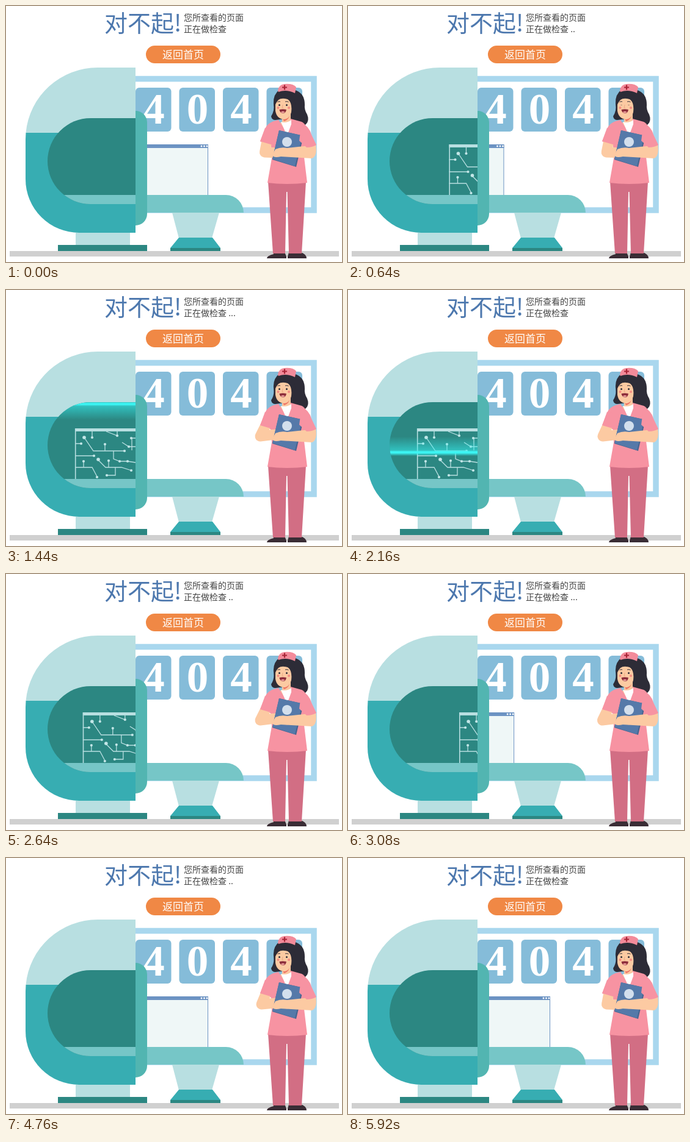
These frames come from a looping animation (550x420 px, 6040 ms). An HTML page:

```html
<!DOCTYPE html>
<html lang="zh">
<head>
<meta charset="utf-8">
<style>
html, body { margin: 0; width: 100%; height: 100%; overflow: hidden; background: #fff; }
svg { display: block; width: 550px; height: 420px; font-family: "Noto Sans CJK SC", "Noto Sans CJK", "Noto Sans SC", sans-serif; }
.digit { font: bold 71px "Liberation Serif", serif; fill: #fff; text-anchor: middle; }
</style>
</head>
<body>
<svg viewBox="0 0 550 420">
  <defs>
    <clipPath id="cavity"><path d="M212 184H138.500A70.500 70.500 0 0 0 138.500 325H212Z"/></clipPath>
    <linearGradient id="glow" x2="0" y2="1">
      <stop stop-color="#35eeee" stop-opacity="0"/>
      <stop offset=".7" stop-color="#35eeee" stop-opacity=".55"/>
      <stop offset=".78" stop-color="#3cf6f4"/>
      <stop offset=".84" stop-color="#3cf6f4"/>
      <stop offset="1" stop-color="#35eeee" stop-opacity="0"/>
    </linearGradient>
  </defs>

  <text x="161" y="42" font-size="38" fill="#4d78ae">对不起!</text>
  <g font-size="14" fill="#444">
    <text x="291" y="24">您所查看的页面</text>
    <text x="291" y="43" id="status">正在做检查</text>
  </g>
  <rect x="229" y="65" width="122" height="29" rx="14.5" fill="#f08845"/>
  <text x="256" y="86" font-size="17" font-weight="500" fill="#fff">返回首页</text>

  <path d="M6 402H545V411H6Z" fill="#d0d0d0"/>
  <path d="M200 119.500H504V335H200" fill="none" stroke="#a9d7ee" stroke-width="9.500"/>
  <g id="tiles" fill="#85bcd9"></g>

  <g id="page">
    <path d="M215 227.500H330.500V311H215Z" fill="#eff7f7" stroke="#6c93c3"/>
    <path d="M215 227H331V233H215Z" fill="#6c93c3"/>
    <g fill="#fff"><circle cx="320" cy="230" r="1.400"/><circle cx="324.500" cy="230" r="1.400"/><circle cx="329" cy="230" r="1.400"/></g>
  </g>

  <path d="M212 101H150A118 118 0 0 0 32.500 208H212Z" fill="#b8dfe1"/>
  <path d="M32.500 208H212V372H120A88 88 0 0 1 32 284V219Z" fill="#37adb2"/>
  <path d="M114 372H203V392H114Z" fill="#b8dfe1"/>
  <path d="M85 392H231V402H85Z" fill="#2c8782"/>
  <g clip-path="url(#cavity)">
    <path d="M60 184H212V325H60Z" fill="#2c8782"/>
    <g id="scan" fill="none" stroke="#b8dfe1" stroke-width="1.300">
      <path d="M0 0H120V5H0Z" fill="#b8dfe1" stroke="none"/>
      <path d="M.700 0V84" stroke-width="1.600"/>
      <path d="M15 15L30 37H81M28 5V16M0 25H10M49 26V37M51 5L69 12V5M99 16H92M99 30H88L77 23M0 45H31M38 52L50 64H76L92 69M55 53V64M14 54V64M0 64H28L36 79M52 77H66V64M63 37V50L73 54H86L99 56M93 16V36"/>
      <g id="nodes" fill="#c4e7e8" stroke="none"></g>
    </g>
    <rect id="beam" x="68" y="-26" width="144" height="32" fill="url(#glow)"/>
    <path d="M60 310H212V326H60Z" fill="#76c6c7"/>
  </g>
  <path d="M231 310H360A29 29 0 0 1 389 339H231Z" fill="#76c6c7"/>
  <path d="M212 172A19 19 0 0 1 231 191V341A19 19 0 0 1 212 360Z" fill="#52b5b1"/>
  <path d="M272 339H349L337 381H283Z" fill="#b8dfe1"/>
  <path d="M283 380H338L351 397H269Z" fill="#37adb2"/>
  <path d="M269 397H351V402H269Z" fill="#2c8782"/>

  <!-- nurse -->
  <path d="M448 137Q462 132 478 140Q489 146 489 162Q488 170 493 178Q497 188 491 194Q484 200 475 197Q466 193 466 184L441 187Q435 187 434 181Q440 172 438 160Q437 145 448 137Z" fill="#2d2c37"/>
  <path d="M438 404L455 401L459 411V414H427Q427 410 438 407ZM464 401L482 404Q492 407 492 414H461V411Z" fill="#3a2d35"/>
  <path d="M429 288H491L484 406H463L460.500 305H459L457 406H437Z" fill="#d26e84"/>
  <path d="M452 176H466V190L475 198L462 210L445 194L452 190Z" fill="#fbc7a0"/>
  <path d="M452 183Q460 184 465 178Q463 187 455 189Z" fill="#ee7463"/>
  <path d="M446 187Q428 190 424 202L416 222L434 229L435 250L428 290Q460 294 493 290L488 248L498 230L499 218Q493 194 484 190L466 185L461 210Z" fill="#f793a2"/>
  <path d="M450 190Q459 193 467 187L467 194L460 213Z" fill="#fff"/>
  <path id="arm" fill="none" stroke="#fccaa2" stroke-width="17" stroke-linejoin="round" stroke-linecap="round"/>
  <path d="M424 200L416 222L440 229L448 206Z" fill="#f793a2"/>
  <path d="M447 204L487 213L475 264L436 252Z" fill="#47658f"/>
  <path d="M447 204L485 212.500L473 263L436 251Z" fill="#5579a9"/>
  <circle cx="460" cy="223" r="8" fill="#d3dfed"/>
  <path d="M441 235Q450 231 460 233L497 229L507 227Q510 246 501 250L450 247Q437 250 436 244Z" fill="#fccaa2"/>
  <path d="M484 192Q496 197 500 211L508 228Q501 232 492 232L480 221Z" fill="#f793a2"/>

  <path d="M441 155Q446 147 462 149Q468 154 468 169Q466 185 455 186Q443 185 441 172Z" fill="#fccaa2"/>
  <path d="M439 168Q436 143 456 140Q476 142 474 172L467 176Q469 158 461 153Q451 150 446 154Q441 159 439 168Z" fill="#2d2c37"/>
  <path d="M445 139Q446 129 456 128Q470 127 475 133L473 143Q459 136 446 141Z" fill="#f38b9a"/>
  <path d="M456 129.500V137.500M452 133.500H460" stroke="#a82436" stroke-width="2.200"/>
  <g fill="#f58d83"><circle cx="445.500" cy="167" r="2"/><circle cx="463" cy="167" r="2"/></g>
  <path d="M444.500 157.500Q447 156 449 157M457 157Q460 156 462.500 157.500" fill="none" stroke="#2d2c37"/>
  <g id="eyes" fill="#2d2c37"><circle cx="447.500" r="1.500"/><circle cx="459.500" r="1.500"/></g>
  <path d="M453 162L452 167H454" fill="none" stroke="#e7a37f" stroke-width=".800"/>
  <path d="M447.500 170Q453 168.500 459 170Q458 176 453 176Q448 175 447.500 170Z" fill="#8c2d3a"/>
  <path d="M450 174Q453 171.500 456.500 174Q453 177 450 174Z" fill="#f0a5a0"/>
</svg>
<script>
const $ = id => document.getElementById(id);
const LOOP = 6040, STEP = 40, TRAVEL = 128, TURN = 1640;
const clamp = v => Math.min(1, Math.max(0, v));
const ease = p => p < .5 ? 2 * p * p : 1 - 2 * (1 - p) ** 2;

$("tiles").innerHTML = ["4", "0", "4", ""].map((d, i) => {
  const x = 212 + i * 71.5;
  return `<rect x="${x}" y="134" width="58.5" height="72" rx="6"/><text class="digit" x="${x + 30}" y="193">${d}</text>`;
}).join("");

$("nodes").innerHTML = [[15, 15, 2.8], [28, 15], [10, 25], [49, 26], [69, 12], [81, 37], [88, 30], [92, 16],
  [31, 45], [38, 51, 2.8], [55, 53], [14, 54], [92, 69], [36, 80], [52, 77], [73, 54], [86, 54]]
  .map(([x, y, r = 2.1]) => `<circle cx="${x}" cy="${y}" r="${r}"/>`).join("");

// Interpolates smoothly between [time, value] keys.
function track(keys, t) {
  const i = keys.findIndex(k => k[0] > t);
  if (i < 1) return keys[i < 0 ? keys.length - 1 : 0][1];
  const [t0, a] = keys[i - 1], [t1, b] = keys[i];
  return a + (b - a) * ease((t - t0) / (t1 - t0));
}

const armKeys = [[0, 0], [500, 0], [1400, 1], [2100, .87], [2700, 1], [3600, .87], [4200, 1], [5720, 0]];

function draw(t) {
  const slide = TRAVEL * (clamp((t - 50) / 1000) - clamp((t - 2540) / 1000));
  $("page").setAttribute("transform", `translate(${-slide})`);
  $("scan").setAttribute("transform", `translate(${241 - slide} 227)`);

  // The beam rises, then sinks again, its glow trailing behind.
  const beamY = 173 + 161 * ease(clamp(Math.abs(t - TURN) / 960));
  $("beam").setAttribute("transform", `translate(0 ${beamY}) scale(1 ${t < TURN ? -1 : 1})`);
  $("beam").setAttribute("visibility", t > 680 && t < 2600 ? "visible" : "hidden");

  const phase = t % 2000;
  const dots = phase >= 1600 ? 0 : [300, 600, 1000].filter(s => phase >= s).length;
  $("status").textContent = "正在做检查" + (dots ? " " + ".".repeat(dots) : "");

  const swing = track(armKeys, t);
  $("arm").setAttribute("d", `M428 216L${423.5 - 7.5 * swing} 240L448 ${241 - 5 * swing}`);

  const blink = (t - 480 + 1680) % 1680 / 400;
  const open = blink < 1 ? 1 - .8 * Math.sin(Math.PI * blink) : 1;
  $("eyes").setAttribute("transform", `translate(0 162.5) scale(1 ${open})`);
}

const start = performance.now();
function tick() {
  const t = (performance.now() - start) % LOOP;
  draw(Math.floor(t / STEP) * STEP);
  requestAnimationFrame(tick);
}
tick();
</script>
</body>
</html>
```
